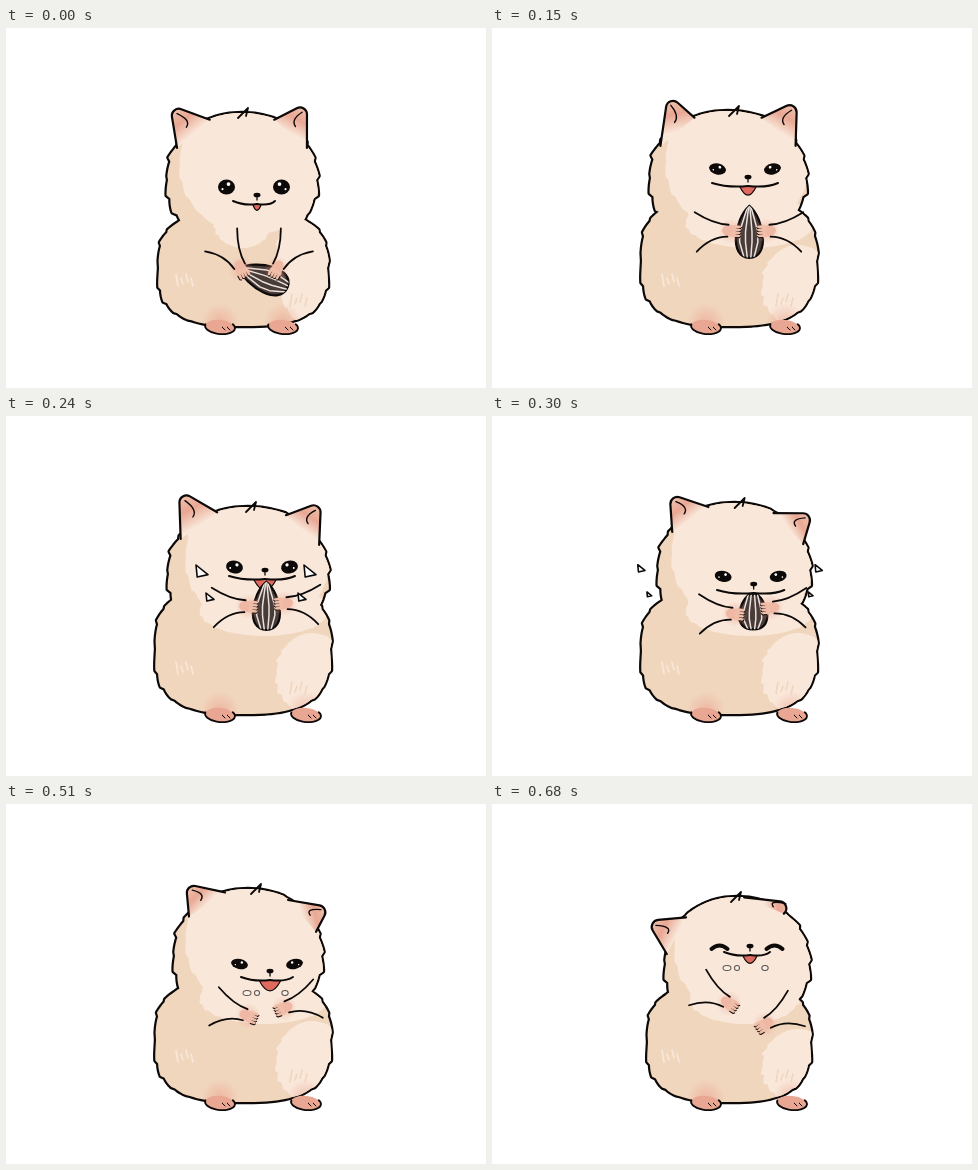
Recreate the animation shown at these times as an HTML page with a canvas. Size 480x360 px, loop 0.81 s.

```html
<!DOCTYPE html>
<html lang="en">
<meta charset="utf-8">
<title>Hamster eating a seed</title>
<style>
  html, body { margin: 0; width: 100%; height: 100%; overflow: hidden; background: #fff; }
  canvas { display: block; }
</style>
<canvas id="stage" width="480" height="360"></canvas>
<script>
const ctx = document.getElementById('stage').getContext('2d');
const INK = '#0c0908', LIGHT = '#f9e8da', SHADE = '#f1d6be', PINK = '#e9a793', RED = '#df6a5d';
const LOOP = 810, BELLY_X = 237, FLOOR = 299, HEAD_H = 67;

// head: x, y, half width, tilt      belly: y, half width     earL, earR: tip
// face: x, y, eye height            mouth: drop, half width, tongue
// paws: x, y, pointing angle        seed: half length, angle
// light: half width of the chest patch, height of the belly patch
const hold = {
  step: 0, head: [236, 152, 74, 0], belly: [240, 84], earL: [164, 77], earR: [301, 75],
  face: [248, 159, 15], mouth: [17, 21, 8], paws: [253, 241, 1.1], seed: [26, -1.2],
  light: [28, 236], foot: [277]
};
const turn = { ...hold, step: 2, face: [248, 159, 8], paws: [254, 233, .8], seed: [27, -.42] };
const lift = {
  ...turn, step: 5, head: [236, 150, 77, 0], belly: [233, 87], earL: [176, 66], earR: [305, 73],
  face: [253, 141, 11], mouth: [17, 33, 16], paws: [257, 203, .1], seed: [26, 0],
  light: [64, 258], foot: [293]
};
const bite = {
  ...lift, step: 8, head: [242, 158, 79, .05], earL: [173, 74], earR: [315, 86],
  face: [256, 151, 13], mouth: [12, 33, 22], paws: [260, 189, .1], seed: [24, 0], foot: [300]
};
const chew = {
  ...bite, step: 11, head: [242, 152, 73, .13], belly: [236, 87], earL: [180, 80], earR: [323, 103],
  face: [260, 165, 10], mouth: [19, 34, 0], paws: [261, 198, .15], seed: [14, 0]
};
const finish = { ...chew, step: 13, face: [261, 160, 10], mouth: [16, 26, 21], paws: [260, 208, .4], seed: [0, 0] };
const smile = {
  ...finish, step: 15, head: [245, 160, 71, -.35], belly: [238, 81], earL: [155, 117], earR: [303, 99],
  face: [255, 143, 3], mouth: [8, 23, 14], paws: [255, 210, .6], light: [54, 262]
};
const poses = [hold, turn, lift, bite, chew, finish, smile];

function stepAt(t) {
  if (t < 300) return Math.floor(t / 30);
  if (t < 580) return 10 + Math.floor((t - 300) / 70);
  return t < 680 ? 14 : 15;
}

function poseAt(step) {
  const i = Math.min(poses.findLastIndex(p => p.step <= step), poses.length - 2);
  const [a, b] = [poses[i], poses[i + 1]], k = (step - a.step) / (b.step - a.step);
  const pose = {};
  for (const part in a)
    if (part !== 'step') pose[part] = a[part].map((v, n) => v + (b[part][n] - v) * k);
  return pose;
}

const noise = i => Math.abs(Math.sin(i * 12.9898) * 43758.5453) % 1;

// Furry superellipse: tufts hang down both sides and are longest at the middle.
function blob(x, y, rx, ry, power = 2, fur = 4) {
  const path = new Path2D(), n = 120;
  const bend = v => Math.sign(v) * Math.abs(v) ** (2 / power);
  for (let k = 0; k < n; k++) {
    const a = k / n * 2 * Math.PI, m = Math.min(k, n - k), tuft = Math.floor(m / 5) + (k > n / 2 ? 50 : 0);
    const tip = fur * Math.sin(a) ** 2 * noise(tuft) * (m % 5) / 4;
    path.lineTo(x + (rx + tip) * bend(Math.sin(a)), y - (ry + tip / 2) * bend(Math.cos(a)));
  }
  path.closePath();
  return path;
}

function line(width, color, ...points) {
  ctx.beginPath();
  points.forEach(p => ctx.lineTo(...p));
  ctx.lineWidth = width;
  ctx.strokeStyle = color;
  ctx.stroke();
}
function curve(width, from, control, to) {
  ctx.beginPath();
  ctx.moveTo(...from);
  ctx.quadraticCurveTo(...control, ...to);
  ctx.lineWidth = width;
  ctx.strokeStyle = INK;
  ctx.stroke();
}
function oval(x, y, rx, ry, fill, angle = 0) {
  ctx.beginPath();
  ctx.ellipse(x, y, rx, ry, angle, 0, 7);
  ctx.fillStyle = fill;
  ctx.fill();
}
function glow(x, y, r) {
  const g = ctx.createRadialGradient(x, y, 0, x, y, r);
  g.addColorStop(0, 'rgba(235,160,140,.6)');
  g.addColorStop(1, 'rgba(235,160,140,0)');
  oval(x, y, r, r, g);
}
function placed(x, y, angle, mirror, paint) {
  ctx.save();
  ctx.translate(x, y);
  ctx.scale(mirror, 1);
  ctx.rotate(angle);
  paint();
  ctx.restore();
}

function drawBody({ head: [hx, hy, hw], belly: [by, bw], light: [chest, patch], foot: [footX], face: [fx] }) {
  const body = blob(hx, hy, hw, HEAD_H, 2.1, 6);
  body.addPath(blob(BELLY_X, by, bw, FLOOR - 1 - by, 2.8));
  ctx.lineWidth = 4.4;
  ctx.strokeStyle = INK;
  ctx.stroke(body);
  ctx.fillStyle = SHADE;
  ctx.fill(body);

  ctx.save();
  ctx.clip(body);
  ctx.fillStyle = LIGHT;
  ctx.fill(blob(hx + 10, hy - 17, 72, 72));
  ctx.fill(blob(220 + chest * .6, 194, chest, 26));
  ctx.fill(blob(306, patch, 35, FLOOR - patch, 2, 6));
  for (const x of [214, footX]) glow(x, FLOOR - 4, 20);
  for (let i = 0; i < 4; i++) {
    line(1.6, LIGHT, [170 + i * 5, 246 + i % 2 * 4], [172 + i * 5, 258 - i % 3 * 2]);
    line(1.6, SHADE, [286 + i * 5, 266 + i % 2 * 4], [284 + i * 5, 278 - i % 3 * 2]);
  }
  ctx.restore();

  const top = hy - HEAD_H;
  line(1.8, INK, [fx - 16, top + 5], [fx - 6, top - 5], [fx - 8, top + 3]);
}

function drawEar([tx, ty], [hx, hy, hw, tilt], side) {
  const rim = a => [hx + side * hw * Math.cos(a), hy - HEAD_H * Math.sin(a)];
  const [low, high] = [rim(.5 - side * tilt), rim(1.12 - side * tilt)];
  const mid = [(low[0] + high[0]) / 2, (low[1] + high[1]) / 2];
  const toward = k => [tx + (mid[0] - tx) * k, ty + (mid[1] - ty) * k];
  const g = ctx.createLinearGradient(tx, ty, ...mid);
  g.addColorStop(.2, '#eebfab');
  g.addColorStop(.55, PINK);
  g.addColorStop(1, LIGHT);
  ctx.beginPath();
  ctx.moveTo(...low);
  ctx.arcTo(tx, ty, ...high, 7);
  ctx.lineTo(...high);
  ctx.fillStyle = g;
  ctx.fill();
  ctx.lineWidth = 2.2;
  ctx.strokeStyle = INK;
  ctx.stroke();
  const [x, y] = toward(.7);
  curve(1.4, toward(.3), [x - side * 5, y - 5], [x, y + 2]);
}

function drawFoot(x) {
  oval(x, FLOOR, 15, 7, PINK, .1);
  ctx.beginPath();
  ctx.ellipse(x, FLOOR, 15, 7, .1, -.6, 3.3);
  ctx.lineWidth = 1.8;
  ctx.strokeStyle = INK;
  ctx.stroke();
  for (const d of [5, 10]) line(1, INK, [x + d - 3, FLOOR], [x + d, FLOOR + 3]);
}

function drawEye(x, y, h, side) {
  if (h < 4) return curve(4, [x - 8, y + 2], [x, y - 5], [x + 8, y + 2]);
  placed(x, y, h < 14 ? -.2 : 0, side, () => {
    oval(0, 0, 8.5, h / 2, INK);
    oval(-2, -h / 5, h / 8, h / 8, '#fff');
    oval(4, h / 7, h / 14, h / 14, '#fff');
  });
}

function drawFace({ face: [x, y, eyeH], mouth: [drop, half, tongue] }) {
  const my = y + drop, mx = x + 3;
  for (const side of [-1, 1]) drawEye(x + side * 27.5, y, eyeH, side);
  if (tongue > 2) {
    ctx.beginPath();
    ctx.moveTo(mx - tongue / 2, my + 1);
    ctx.quadraticCurveTo(mx, my + 6 + tongue * .7, mx + tongue / 2, my + 1);
    ctx.fillStyle = RED;
    ctx.fill();
    ctx.lineWidth = 1.2;
    ctx.stroke();
  }
  oval(mx, my - 9, 3.5, 2.3, INK);
  line(1.3, INK, [mx, my - 8], [mx, my - 4]);
  for (const side of [-1, 1])
    curve(2, [mx, my], [mx + side * half * .6, my + 2], [x + side * half, my - 3]);
}

function drawSeed(x, y, length, angle) {
  if (length < 2) return;
  const end = Math.max(0, 22 - length);
  placed(x, y, angle, 1, () => {
    ctx.beginPath();
    ctx.moveTo(-end, -length);
    ctx.lineTo(end, -length);
    ctx.bezierCurveTo(15, -length * .5, 21, length, 0, length);
    ctx.bezierCurveTo(-21, length, -15, -length * .5, -end, -length);
    ctx.fillStyle = '#493b38';
    ctx.fill();
    ctx.lineWidth = 2.2;
    ctx.strokeStyle = INK;
    ctx.stroke();
    ctx.clip();
    for (const s of [-.75, -.3, .2, .65])
      line(1.5, '#e9e1dc', [s * (2 + end), -length], [s * 13, 0], [s * 13, length * .4], [s * 7, length]);
  });
}

function drawArm(x, y, angle, side) {
  glow(x, y, 13);
  placed(x, y, angle, -side, () => {
    oval(-1, 0, 8, 5.5, '#efb8a4');
    for (const d of [-4.5, -1.5, 1.5, 4.5]) {
      oval(5, d, 5, 1.8, '#f0bda9');
      line(1, INK, [5, d + 1.6], [9, d + 1.4], [10, d]);
    }
    curve(1.8, [-38, -15], [-18, -5], [-3, -6]);
    curve(1.8, [-32, 24], [-20, 8], [-3, 6]);
  });
}

function drawShards(flight) {
  for (const side of [-1, 1])
    for (const row of [0, 1]) {
      const x = 250 + side * (54 - row * 8 + flight * (side < 0 ? 70 : 34));
      const y = 155 + row * 26 - flight * 4, r = (6 - row * 2) / (1 + flight);
      ctx.beginPath();
      ctx.moveTo(x - r, y - r);
      ctx.lineTo(x + r, y + r * .6);
      ctx.lineTo(x - r * .8, y + r);
      ctx.closePath();
      ctx.fillStyle = '#fff';
      ctx.fill();
      ctx.lineWidth = 1.6;
      ctx.strokeStyle = INK;
      ctx.stroke();
    }
}

function drawCrumbs(x, y) {
  for (const [dx, r] of [[-20, 4.5], [-10, 3], [18, 3.7]]) {
    oval(x + dx, y, r, 3, '#5c5049');
    oval(x + dx, y, r - 1, 2, '#f7f1ea');
  }
}

function draw(time) {
  const step = stepAt(time % LOOP), pose = poseAt(step);
  const { head, face, mouth, paws: [px, py, point], seed } = pose;
  ctx.fillStyle = '#fff';
  ctx.fillRect(0, 0, 480, 360);
  ctx.lineCap = ctx.lineJoin = 'round';

  drawBody(pose);
  drawEar(pose.earL, head, -1);
  drawEar(pose.earR, head, 1);
  drawFoot(214);
  drawFoot(pose.foot[0]);
  drawFace(pose);
  drawSeed(px + 4 * point, py + 8 * point, ...seed);
  for (const side of [-1, 1]) drawArm(px + side * 18, py - side * head[3] * 30, point, side);
  if (step >= 8 && step <= 12) drawShards((step - 8) / 3);
  if (step >= 12) drawCrumbs(face[0], face[1] + mouth[0] + 13);
}

(function tick() {
  draw(performance.now());
  requestAnimationFrame(tick);
})();
</script>
</html>
```
